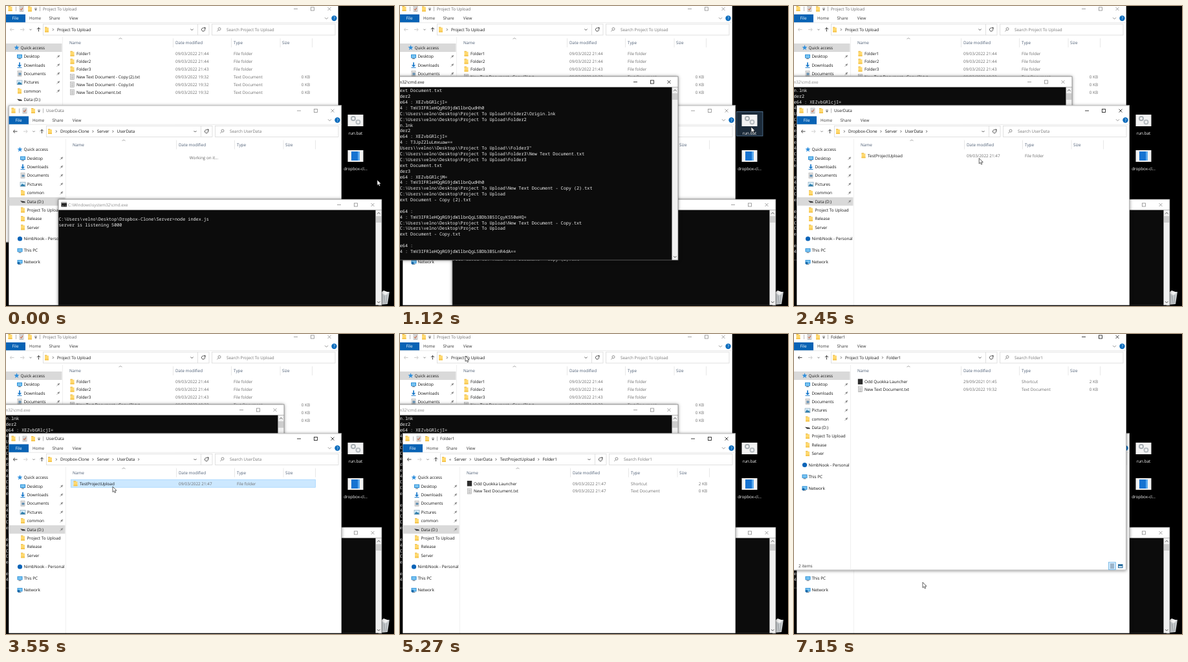
An HTML page with a canvas that plays this animation: 600 by 464 pixels, repeating every 7.21 s.

```html
<!DOCTYPE html>
<html lang="en">
<head>
<meta charset="utf-8">
<title>Folder upload demo</title>
<style>
html, body { margin: 0; width: 100%; height: 100%; overflow: hidden; background: #000; }
canvas { display: block; }
</style>
</head>
<body>
<canvas id="stage" width="600" height="464"></canvas>
<script>
const screenCtx = document.getElementById('stage').getContext('2d');
const layer = document.createElement('canvas');
layer.width = 600;
layer.height = 464;
const layerCtx = layer.getContext('2d');
let g = screenCtx;
const LOOP = 7210;
const UI = '6.35px "Open Sans", "Noto Sans", sans-serif';
const MONO = '6.8px "Noto Sans Mono", "DejaVu Sans Mono", monospace';
const COL = 4.08, ROW = 8.88;
const clamp = (v, a, b) => Math.min(b, Math.max(a, v));

// ---- drawing helpers ----
function box(x, y, w, h, color) {
  g.fillStyle = color;
  g.fillRect(x, y, w, h);
}
function frame(x, y, w, h, color, width = 1) {
  g.strokeStyle = color;
  g.lineWidth = width;
  g.strokeRect(x, y, w, h);
}
function pane(x, y, w, h, color) {
  g.shadowColor = 'rgba(0,0,0,.5)';
  g.shadowBlur = 5;
  box(x, y, w, h, color);
  g.shadowBlur = 0;
  g.shadowColor = 'transparent';
}
function line(color, width, ...p) {
  g.strokeStyle = color;
  g.lineWidth = width;
  g.beginPath();
  for (let i = 0; i < p.length; i += 2) g.lineTo(p[i], p[i + 1]);
  g.stroke();
}
function shape(color, ...p) {
  g.fillStyle = color;
  g.beginPath();
  for (let i = 0; i < p.length; i += 2) g.lineTo(p[i], p[i + 1]);
  g.fill();
}
function disc(x, y, r, color) {
  g.fillStyle = color;
  g.beginPath();
  g.arc(x, y, r, 0, 7);
  g.fill();
}
function ring(x, y, r, color, width, from = 0, to = 7) {
  g.strokeStyle = color;
  g.lineWidth = width;
  g.beginPath();
  g.arc(x, y, r, from, to);
  g.stroke();
}
// y is the middle of the capitals
function text(s, x, y, color = '#111', align = 'left', font = UI) {
  g.font = font;
  g.textRendering = 'geometricPrecision';
  g.textAlign = align;
  g.fillStyle = color;
  g.fillText(s, x, y + 2.3);
}

// ---- icons, all centred on x, y ----
const icons = {
  folder(x, y) {
    box(x - 3, y - 4, 3.5, 2, '#e8b63f');
    box(x - 3, y - 3, 6, 7, '#ffd970');
    box(x - 3, y + 2, 6, 2, '#f6c64f');
  },
  page(x, y) {
    box(x - 3, y - 4, 6, 8, '#f4f4f4');
    frame(x - 3, y - 4, 6, 8, '#9c9c9c', .6);
    for (let i = -2; i < 4; i += 1.6) line('#8d8d8d', .6, x - 2, y + i, x + 2, y + i);
  },
  app(x, y) { box(x - 3.7, y - 4.2, 7.4, 8.4, '#2d2d2d'); },
  cloud(x, y) { disc(x, y, 3.6, '#0a64b8'); },
  star(x, y) {
    const p = [];
    for (let i = 0; i < 10; i++) {
      const a = i * Math.PI / 5 - Math.PI / 2, r = i % 2 ? 1.8 : 4.2;
      p.push(x + r * Math.cos(a), y + r * Math.sin(a));
    }
    shape('#2f8fdc', ...p);
  },
  screen(x, y) {
    box(x - 4, y - 3, 8, 5.5, '#2a8fd8');
    box(x - 3, y - 2, 6, 3.5, '#7cc6f2');
    box(x - 2, y + 3, 4, 1, '#567');
  },
  down(x, y) {
    line('#1979ca', 1.7, x, y - 4, x, y + 1);
    shape('#1979ca', x - 3.2, y, x + 3.2, y, x, y + 3.2);
    line('#1979ca', 1, x - 3.5, y + 4, x + 3.5, y + 4);
  },
  doc(x, y) {
    icons.page(x, y);
    box(x - 1.5, y - 1, 4, 3, '#5f8fb4');
  },
  picture(x, y) {
    box(x - 4, y - 3, 8, 6.5, '#d9eefb');
    shape('#2f7fae', x - 4, y + 3.5, x - 1, y - 1, x + 1, y + 1, x + 2, y, x + 4, y + 3.5);
    frame(x - 4, y - 3, 8, 6.5, '#7f9db0', .6);
  },
  drive(x, y) { shape('#3b3b3b', x - 4, y - 1, x + 3, y, x + 4, y + 2, x - 1, y + 2); },
  net(x, y) {
    icons.screen(x, y);
    disc(x - 2, y + 2, 2, '#1769aa');
  }
};
function controls(x, y, step, color) {
  line(color, .8, x - 3, y, x + 3, y);
  frame(x + step - 2.5, y - 2.5, 5, 5, color, .8);
  const c = x + 2 * step;
  line(color, .8, c - 2.5, y - 2.5, c + 2.5, y + 2.5);
  line(color, .8, c + 2.5, y - 2.5, c - 2.5, y + 2.5);
}
function chevron(x, y, color = '#666', r = 2) {
  line(color, .9, x - Math.abs(r), y - r / 2, x, y + r / 2, x + Math.abs(r), y - r / 2);
}
function arrow(x, y, color, dir) {
  line(color, .9, x - 3, y, x + 3, y);
  line(color, .9, x + dir, y - 2.5, x + 3 * dir, y, x + dir, y + 2.5);
}
function pin(x, y) {
  line('#8a8a8a', .8, x - 2.5, y + 2.5, x, y);
  line('#8a8a8a', 1.6, x - 1, y - 1, x + 1, y + 1);
  line('#8a8a8a', 1.4, x, y, x + 1.8, y - 1.8);
}

// ---- file lists: [icon, name, date, type, size] ----
const DAY = '09/03/2022 ';
const DOC = 'New Text Document';
const LAUNCHER = 'Odd Quokka Launcher';
const dir = (name, time) => ['folder', name, DAY + time, 'File folder', ''];
const txt = (name, time) => ['page', name + '.txt', DAY + time, 'Text Document', '0 KB'];
const root = (a, b, c) => [
  dir('Folder1', a), dir('Folder2', a), dir('Folder3', b),
  txt(DOC + ' - Copy (2)', c), txt(DOC + ' - Copy', c), txt(DOC, c)
];
const inner = (day, time) => [['app', LAUNCHER, day, 'Shortcut', '2 KB'], txt(DOC, time)];

const sidebar = [
  ['star', 'Quick access', 64.5], ['screen', 'Desktop', 78], ['down', 'Downloads', 91.2],
  ['doc', 'Documents', 104.6], ['picture', 'Pictures', 118], ['folder', 'common', 131.4],
  ['drive', 'Data (D:)', 144.8], ['folder', 'Project To Upload', 158], ['folder', 'Release', 171.4],
  ['folder', 'Server', 184.8], ['cloud', 'NimbNook - Personal', 202.5], ['screen', 'This PC', 220.3],
  ['net', 'Network', 238.3]
];

function explorer(dx, dy, w) {
  g.save();
  g.translate(dx, dy);
  pane(-1, -4, 515, 369.5, '#fff');
  frame(-.5, -3.5, 514, 368.5, '#9a9a9a', .7);

  // title bar
  const ink = w.active ? '#111' : '#8c8c8c';
  icons.folder(6.5, 4);
  line('#999', .7, 15.5, 1, 15.5, 8);
  icons.page(24, 4.5);
  line('#d0562b', 1, 22, 4.5, 23.5, 6.5, 26, 2.5);
  icons.folder(37, 4.5);
  line('#444', .7, 44, 3.5, 48, 3.5);
  shape('#444', 44, 5, 48, 5, 46, 7);
  line('#999', .7, 52.5, 1, 52.5, 8);
  text(w.title, 57, 4.5, w.active ? '#1a1a1a' : '#666');
  controls(448, 4.5, 26, ink);

  // ribbon tabs
  box(-.5, 13, 30.5, 12.5, '#0863b5');
  text('File', 14.5, 19, '#fff', 'center');
  text('Home', 45, 19, '#333', 'center');
  text('Share', 75, 19, '#333', 'center');
  text('View', 104.5, 19, '#333', 'center');
  chevron(495.5, 19, '#888', 2.5);
  disc(507.5, 19, 4.2, '#0b6cbd');
  text('?', 507.5, 19, '#fff', 'center');
  line('#e2e2e2', .8, 0, 25.8, 514, 25.8);

  // address row
  arrow(9.5, 36.5, w.back ? '#333' : '#c4c4c4', -1);
  arrow(25, 36.5, '#c8c8c8', 1);
  chevron(38, 36.5, '#777', 1.6);
  line('#333', .9, 50.5, 39.5, 50.5, 33.5);
  line('#333', .9, 48, 36, 50.5, 33.5, 53, 36);
  frame(57.5, 28, 256.5, 17, '#d9d9d9', .8);
  line('#d9d9d9', .8, 296.5, 28, 296.5, 45);
  icons.folder(63, 36.5);
  let x = 79;
  w.path.forEach((part, i) => {
    if (!i && w.cut) text('«', x - 6.5, 36, '#333', 'center');
    else line('#444', .8, x - 7, 34.8, x - 5.4, 36.5, x - 7, 38.2);
    text(part, x, 36.5);
    x += g.measureText(part).width + 12;
  });
  chevron(287.5, 36.5, '#444', 2);
  ring(305, 36.5, 2.6, '#444', .9, -.4, 5);
  shape('#444', 305.5, 33, 308.5, 33, 308.5, 36);
  frame(318.5, 28, 190.5, 17, '#d9d9d9', .8);
  ring(330, 35.5, 2, '#777', .8);
  line('#777', .8, 328.6, 37, 326.4, 39.4);
  text('Search ' + w.title, 341, 36.5, '#757575');

  // navigation pane
  line('#ececec', .8, 87.5, 48, 87.5, 365);
  sidebar.forEach(([icon, label, y], i) => {
    const top = /Quick|Nimb|This|Net/.test(label);
    if (label === w.place) box(-.5, y - 6.5, 87, 13, '#d9d9d9');
    icons[icon](top ? 16.5 : 21, y);
    text(label, top ? 22.5 : 27.5, y);
    if (i > 0 && i < 6 || label === w.place && i) pin(81, y);
  });

  // column headings
  [['Name', 98], ['Date modified', 262], ['Type', 352], ['Size', 427]]
    .forEach(([s, cx]) => text(s, cx, 57, '#4c5d74'));
  [258.5, 348.5, 424, 473.5].forEach(cx => line('#e3e3e3', .8, cx, 50, cx, 64));
  line('#888', .7, 174.5, 51, 177, 49.5, 179.5, 51);

  // rows
  if (!w.files) text('Working on it...', 301, 77.5, '#666', 'center');
  (w.files || []).forEach(([icon, name, date, type, size], i) => {
    const y = 73.7 + 11.9 * i;
    if (!i && w.mark) {
      box(95.5, y - 6, 378, 12, w.mark > 1 ? '#cce8ff' : '#e5f3ff');
      if (w.mark > 1) frame(95.5, y - 6, 378, 12, '#99d1ff', .7);
    }
    icons[icon](102.5, y);
    text(name, 109, y);
    text(date, 262, y, '#6d6d6d');
    text(type, 352, y, '#6d6d6d');
    text(size, 470, y, '#6d6d6d', 'right');
  });

  // status bar
  const n = w.files ? w.files.length : 0;
  text(n + ' items', 7, 359, '#333');
  if (w.mark > 1) text('1 item selected', 41, 359, '#333');
  box(486.5, 353, 11, 11.5, '#cce8ff');
  frame(486.5, 353, 11, 11.5, '#5fa8dc', .7);
  for (let y = 356; y < 363; y += 2) line('#456', .7, 489, y, 495, y);
  box(501, 356, 7.5, 6, '#2c6f9f');
  box(502, 359, 5.5, 2, '#cfe6f5');
  g.restore();
}

// ---- consoles ----
const HOME = 'C:\\Users\\velno\\Desktop\\';
const uploads = [
  ['\\Folder1', 'Epic Games Launcher.lnk'], ['\\Folder1', DOC + '.txt'],
  ['\\Folder2', DOC + '.txt'], ['\\Folder2', 'Origin.lnk'], ['\\Folder3', DOC + '.txt'],
  ['', DOC + ' - Copy (2).txt'], ['', DOC + ' - Copy.txt'], ['', DOC + '.txt']
];
// client log entries: [column, text]
const clientLog = [];
uploads.forEach(([folder, name], i) => {
  const path = HOME + 'Project To Upload' + folder;
  if (folder && (!i || uploads[i - 1][0] !== folder))
    clientLog.push([-5, '"' + path.replace(/\\/g, '\\\\') + '"']);
  clientLog.push([0, path + '\\' + name], [0, path], [-5, name], [-4, folder],
    [-3, 'base64 : ' + btoa(folder)], [-5, 'base64 : ' + btoa(name)]);
});
const serverLog = [
  '', HOME + 'Dropbox-Clone\\Server>node index.js', 'server is listening 5000',
  ...uploads.map(([folder, name]) => 'File Saved to: ' + folder + '/' + name)
];

function consoleWindow(x, y, h, active, lines, left, barAlpha = 1) {
  const w = 500, ink = active ? '#111' : '#8a8a8a';
  pane(x, y, w, h, '#0c0c0c');
  box(x, y, w, 16.5, '#fff');
  box(x + 4.5, y + 4.5, 8.5, 7, '#222');
  box(x + 4.5, y + 4.5, 8.5, 1.5, '#bbb');
  text('c:\\', x + 6, y + 9, '#fff', 'left', '3.5px "Noto Sans Mono", monospace');
  text('C:\\Windows\\system32\\cmd.exe', x + 15, y + 8.5, ink);
  controls(x + 434, y + 8.5, 26, ink);
  g.globalAlpha = barAlpha;
  box(x + 490.5, y + 16.5, 9.5, h - 16.5, '#f0f0f0');
  box(x + 491, y + 26, 8.5, 10, '#cdcdcd');
  chevron(x + 495.3, y + 21.5, '#444', -2.2);
  chevron(x + 495.3, y + h - 5, '#444', 2.2);
  g.globalAlpha = 1;
  frame(x, y, w, h, '#777', .7);
  lines.forEach(([col, s], i) =>
    text(s, left + col * COL, y + 22 + i * ROW, '#f0f0f0', 'left', MONO));
}

// ---- timeline ----
const OPEN = 900, RAISE_DATA = 1920, LISTED = 2080, ENTER_TEST = 3650,
  ENTER_F1 = 4450, RAISE_PROJECT = 5450, ENTER_LOCAL = 6620;

// pointer keys: time, x, y
const pointerKeys = [
  [0, 574, 269], [60, 574, 269], [420, 543, 187], [1150, 543, 187], [1650, 460, 239],
  [2000, 460, 239], [2800, 168, 233], [3550, 165, 236], [4250, 130, 233], [4600, 130, 233],
  [5220, 101, 34], [5480, 101, 34], [5950, 126, 70], [6660, 126, 70], [7100, 199, 384],
  [LOOP, 199, 384]
];
function pointer(t) {
  const i = pointerKeys.findIndex(k => k[0] > t);
  const [t0, x0, y0] = pointerKeys[i - 1], [t1, x1, y1] = pointerKeys[i];
  const p = (t - t0) / (t1 - t0), e = p * p * (3 - 2 * p);
  g.save();
  g.translate(x0 + (x1 - x0) * e, y0 + (y1 - y0) * e);
  const outline = [0, 0, 0, 8.4, 1.9, 6.7, 3.2, 9.6, 4.7, 9, 3.5, 6.1, 6, 6.1, 0, 0];
  shape('#fff', ...outline);
  line('#222', .7, ...outline);
  g.restore();
}

function desktop(t) {
  box(0, 0, 600, 464, '#000');
  if (t > 330 && t < 1250) {
    box(520, 163, 41, 38, 'rgba(90,140,190,.3)');
    frame(520.5, 163.5, 40.5, 37.5, 'rgba(120,165,210,.7)', .8);
  }
  box(528.5, 168, 24, 18, '#f3f3f3');
  ring(537, 174, 3, '#a9b0b5', 2);
  ring(544.5, 179.5, 3, '#b7bdc1', 2);
  text('run.bat', 540.5, 196.5, '#fff', 'center');
  box(528.5, 223, 24, 18, '#f3f3f3');
  box(534, 225, 13, 14, '#1673d1');
  box(544, 225, 3, 14, '#5aa9ee');
  text('dropbox-cl...', 540.5, 251.5, '#fff', 'center');
  shape('#c9cdd0', 577, 443, 593, 442, 590, 461, 580, 462);
  shape('#f2f2f2', 579, 444, 584, 440, 592, 443, 587, 447);
  line('#8d9295', .7, 585, 448, 586, 460);
  line('#8d9295', .7, 589, 447, 588, 460);
}

function dataWindow(t) {
  const w = { active: t >= RAISE_DATA && t < RAISE_PROJECT, back: true, place: 'Data (D:)' };
  if (t < ENTER_TEST) {
    w.title = 'UserData';
    w.path = ['Dropbox-Clone', 'Server', 'UserData'];
    if (t >= LISTED) {
      w.path.push('');
      w.files = [dir('TestProjectUpload', '21:47')];
      w.mark = t > 3200 ? 2 : t > 2650 ? 1 : 0;
    }
  } else if (t < ENTER_F1) {
    w.title = 'TestProjectUpload';
    w.path = ['Dropbox-Clone', 'Server', 'UserData', 'TestProjectUpload'];
    w.files = root('21:47', '21:47', '21:47');
    w.mark = t > 4250 ? 2 : 1;
  } else {
    w.title = 'Folder1';
    w.cut = true;
    w.path = ['Server', 'UserData', 'TestProjectUpload', 'Folder1'];
    w.files = inner(DAY + '21:47', '21:47');
    w.mark = t < 4750 ? 1 : 0;
  }
  explorer(5, 157.5, w);
}

function projectWindow(t) {
  const w = { active: t >= RAISE_PROJECT, place: 'Quick access' };
  if (t < ENTER_LOCAL) {
    w.title = 'Project To Upload';
    w.path = [w.title];
    w.files = root('21:44', '21:43', '19:32');
    w.mark = t > 6200 ? 2 : t > 5900 ? 1 : 0;
  } else {
    w.title = 'Folder1';
    w.back = true;
    w.path = ['Project To Upload', w.title];
    w.files = inner('29/09/2021 01:45', '19:32');
  }
  explorer(0, 0, w);
}

function serverWindow(t, sent) {
  const lines = serverLog.slice(0, 3 + sent);
  consoleWindow(81, 299, 164, false, lines.map(s => [0, s]), 81.5);
  if (t % 1060 >= 530) box(82, 299 + 24.5 + lines.length * ROW, 4, 1.3, '#fff');
}

// The opening window is painted on its own layer, so that it fades as one piece.
function clientWindow(t, sent) {
  const p = clamp((t - OPEN) / 200, 0, 1), zoom = .946 + .054 * p;
  if (!p) return;
  const end = clientLog.length - 12 + 6 * (clamp(sent, 5, 7) - 5);
  g = layerCtx;
  g.clearRect(0, 0, 600, 464);
  g.save();
  g.translate(180, 251);
  g.scale(zoom, zoom);
  g.translate(-180, -251);
  consoleWindow(-70, 109, 284, t > 1100 && t < RAISE_DATA, clientLog.slice(end - 29, end), -.2, p);
  g.restore();
  g = screenCtx;
  g.globalAlpha = p;
  g.drawImage(layer, 0, 0);
  g.globalAlpha = 1;
}

function draw(t) {
  const sent = clamp(Math.floor((t - 590) / 80), 0, 8);
  const project = () => projectWindow(t), data = () => dataWindow(t);
  const server = () => serverWindow(t, sent), client = () => clientWindow(t, sent);
  desktop(t);
  const stack = t < RAISE_DATA ? [project, data, server, client]
    : t < RAISE_PROJECT ? [project, server, client, data]
    : [server, client, data, project];
  stack.forEach(paint => paint());
  box(0, 462.7, 576, 2, '#000');
  pointer(t);
}

const start = performance.now();
function tick() {
  draw((performance.now() - start) % LOOP);
  requestAnimationFrame(tick);
}
tick();
</script>
</body>
</html>
```
